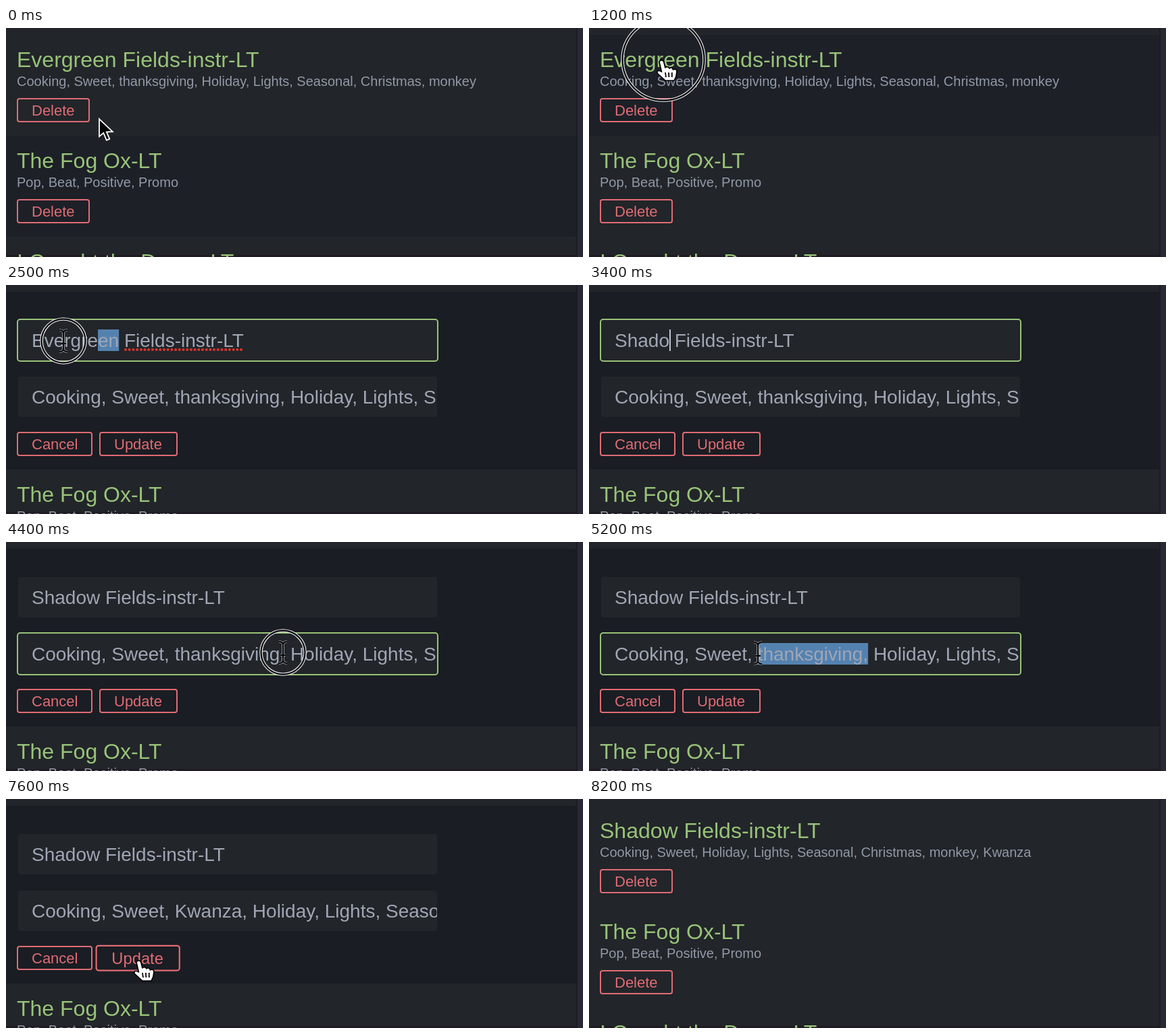
Recreate the animation shown at these times as an HTML page. Size 854 px wide and 340 px high, loop 8300 ms.

```html
<!DOCTYPE html>
<html lang="en">
<head>
<meta charset="utf-8">
<title>Editing a track</title>
<style>
  html, body { margin: 0; width: 854px; height: 340px; overflow: hidden; background: #222529; }
  svg { display: block; }
  text { font-family: "Liberation Sans", Helvetica, Arial, sans-serif; white-space: pre; }
  .title { font-size: 32px; fill: #98c379; }
  .tags { font-size: 20px; fill: #9199a7; }
  .btn text { font-size: 22px; fill: #e06c75; }
  .btn rect { fill: none; stroke: #e06c75; stroke-width: 2; }
  .field text { font-size: 28px; fill: #a0a6b5; }
  .box { fill: #222529; }
  .focus { fill: none; stroke: #98c379; stroke-width: 2; }
  .select { fill: #5482b0; }
  .caret { fill: #c3c8d2; }
  .squiggle { stroke: #d8342f; stroke-width: 4; stroke-linecap: round; stroke-dasharray: 0.1 5.6; }
  .ring { fill: none; }
</style>
</head>
<body>
<svg id="stage" width="854" height="340" viewBox="0 0 854 340">
  <defs>
    <clipPath id="inner"><rect x="18" y="50" width="620" height="150"/></clipPath>
  </defs>
  <rect width="854" height="340" fill="#222529"/>
  <rect id="hover" width="845"/>
  <rect y="337" width="854" height="3" fill="#1f1822" opacity=".75"/>

  <g id="list">
    <text class="title" id="name" x="16" y="58"></text>
    <text class="tags" id="labels" x="16" y="86"></text>
  </g>
  <g id="form"></g>
  <g id="rest">
    <text class="title" x="16" y="208">The Fog Ox-LT</text>
    <text class="tags" x="16" y="236">Pop, Beat, Positive, Promo</text>
    <text class="title" x="16" y="358">I Caught the Dunes-LT</text>
  </g>

  <rect x="844" width="2" height="340" fill="#1b1d24"/>
  <rect x="846" width="8" height="340" fill="#272a35"/>

  <g id="pointer">
    <g id="ring">
      <circle class="ring" stroke="#f2f2f2" stroke-width="4.600"/>
      <circle class="ring" stroke="#0c0d10" stroke-width="2.400"/>
    </g>
    <path id="arrow" transform="translate(1 2) scale(.9)" d="M0 0V29L7 23L12 35L17 33L12 21.500L22 21Z" fill="#000" stroke="#fff" stroke-width="2"/>
    <g id="hand" transform="translate(-1.500 1) scale(1.100 1)" stroke="#000" stroke-width="1.600" stroke-linejoin="round">
      <path fill="#fff" d="M-4 3C-4 -1 1 -1 2 2L4 11C5 9 9 9 9.500 12C11 10 14 11 14.500 14C17 12 20 14 19.500 17L18.500 24L16 30H4L-6 20C-9 16 -5 14 -1 17Z"/>
      <path fill="none" d="M4 18L5 25M8.500 18L9 25M13 18V25"/>
    </g>
    <g id="beam" fill="none">
      <path stroke="#c9ccd2" stroke-width="3.600"/>
      <path stroke="#08090b" stroke-width="2.300"/>
    </g>
  </g>
</svg>
<script>
const LOOP = 8300, STEP = 100;
const OPEN = 1400, SAVE = 8000;
const OLD_WORD = "Evergreen", NEW_WORD = "Shadow", SUFFIX = " Fields-instr-LT";
const HEAD = "Cooking, Sweet, ", OLD_TAG = "thanksgiving,", NEW_TAG = "Kwanza,";
const TAIL = " Holiday, Lights, Seasonal, Christmas, monkey";
const TAG_KEYS = [5400, 5500, 5600, 5800, 5900, 6000, 6200];
const NAME_KEYS = [2900, 3000, 3100, 3300, 3400, 3500];

// time, x, y, pointer shape
const PATH = [
  [0, 137, 133, "arrow"], [100, 180, 215, "arrow"], [200, 270, 300, "arrow"],
  [300, 388, 250, "arrow"], [400, 290, 120, "arrow"], [500, 120, 60, "hand"],
  [600, 38, 44, "hand"], [700, 38, 44, "hand"], [1000, 110, 47, "hand"],
  [1400, 110, 47, "arrow"], [1600, 118, 66, "beam"], [2100, 170, 83, "beam"],
  [2300, 166, 83, "beam"], [2400, 138, 83, "beam"], [2500, 85, 83, "beam"],
  [2600, 54, 83, "beam"], [2700, 46, 83, "beam"], [2900, 46, 83, ""],
  [3600, 56, 83, "beam"], [3800, 120, 98, "beam"], [4300, 410, 164, "beam"],
  [4400, 410, 164, "beam"], [4900, 250, 165, "beam"], [5400, 250, 165, ""],
  [6700, 252, 167, "beam"], [7000, 428, 190, "beam"], [7100, 380, 212, "arrow"],
  [7400, 215, 238, "hand"], [7500, 199, 239, "hand"], [8000, 199, 239, "arrow"],
  [8100, 199, 239, ""], [LOOP, 199, 239, ""]
];
// press, release, ring gone
const CLICKS = [[1000, 1100, 1300], [2300, 2700, 2800], [4400, 4900, 5100], [7700, 7800, 7900]];
// from, top, height, fill of the highlighted row
const HOVER = [
  [0, 160, 150, "#1d2027"], [400, 10, 150, "#1d2027"], [OPEN, 10, 264, "#1a1d23"],
  [SAVE, 160, 150, "#1d2027"], [8100, 0, 0, "none"]
];

const $ = id => document.getElementById(id);
const show = (el, on) => { el.style.display = on ? "" : "none"; };
const setAttrs = (el, attrs) => { for (const k in attrs) el.setAttribute(k, attrs[k]); };
const typed = (word, keys, t) => word.slice(0, keys.filter(k => k <= t).length);

function add(parent, tag, attrs, text = "") {
  const el = document.createElementNS("http://www.w3.org/2000/svg", tag);
  setAttrs(el, attrs);
  el.textContent = text;
  return parent.appendChild(el);
}

function button(parent, x, y, w, label) {
  const g = add(parent, "g", { class: "btn" });
  add(g, "rect", { x: x + 1, y: y + 1, width: w - 2, height: 34, rx: 3 });
  add(g, "text", { x: x + 22, y: y + 26 }, label);
  return g;
}

function field(y) {
  const g = add($("form"), "g", { class: "field" });
  add(g, "rect", { class: "box", x: 18, y: y + 2, width: 620, height: 60, rx: 4 });
  const select = add(g, "rect", { class: "select", y: y + 16, height: 32 });
  const squiggle = add(g, "line", { class: "squiggle", y1: y + 46, y2: y + 46 });
  const text = add(g, "text", { x: 38, y: y + 42, "clip-path": "url(#inner)" });
  const focus = add(g, "rect", { class: "focus", x: 17, y: y + 1, width: 622, height: 62, rx: 4 });
  const caret = add(g, "rect", { class: "caret", y: y + 16, width: 2, height: 32 });
  const at = i => text.getStartPositionOfChar(i).x;

  return ({ value, focused, from = 0, to = 0, caretAt = -1, wavyFrom = -1 }) => {
    text.textContent = value;
    show(focus, focused);
    show(select, to > from);
    show(caret, caretAt >= 0);
    show(squiggle, wavyFrom >= 0);
    if (to > from) setAttrs(select, { x: at(from), width: at(to) - at(from) });
    if (caretAt >= 0) caret.setAttribute("x", at(caretAt));
    if (wavyFrom >= 0) setAttrs(squiggle, { x1: at(wavyFrom) + 2, x2: text.getEndPositionOfChar(value.length - 1).x - 2 });
  };
}

const drawName = field(50), drawTags = field(134);
button($("form"), 16, 218, 112, "Cancel");
const update = button($("form"), 138, 218, 116, "Update");
button($("list"), 16, 104, 108, "Delete");
button($("rest"), 16, 254, 108, "Delete");
for (const p of $("beam").children)
  p.setAttribute("d", "M-6 -16Q0 -16 0 -11V11Q0 16 -6 16M6 -16Q0 -16 0 -11M0 11Q0 16 6 16M-4 4H4");

function drawForm(t) {
  const nameFocus = t >= 2300 && t < 4400, tagFocus = t >= 4400 && t < 7600;
  const newName = typed(NEW_WORD, NAME_KEYS, t), newTag = typed(NEW_TAG, TAG_KEYS, t);
  const nameFrom = t < 2400 ? 9 : t < 2500 ? 8 : t < 2600 ? 7 : t < 2700 ? 3 : 0;
  const drag = Math.min(1, Math.max(0, (t - 4400) / 500));
  const tagEnd = HEAD.length + OLD_TAG.length;
  const blink = start => t < start || Math.floor((t - start) / 500) % 2 === 0;

  drawName({
    value: (newName || OLD_WORD) + SUFFIX,
    focused: nameFocus,
    from: nameFrom,
    to: nameFocus && !newName ? OLD_WORD.length : 0,
    caretAt: nameFocus && newName && blink(3500) ? newName.length : -1,
    wavyFrom: nameFocus && !newName ? OLD_WORD.length + 1 : -1
  });
  drawTags({
    value: HEAD + (newTag || OLD_TAG) + TAIL,
    focused: tagFocus,
    from: Math.round(tagEnd - OLD_TAG.length * drag),
    to: tagFocus && !newTag ? tagEnd : 0,
    caretAt: tagFocus && newTag && blink(6200) ? HEAD.length + newTag.length : -1
  });
  update.setAttribute("transform", t >= 7400 ? "translate(195.200 236.200) scale(1.08) translate(-196 -236)" : "");
}

function drawPointer(t) {
  const i = PATH.findIndex((p, n) => t >= p[0] && t < PATH[n + 1][0]);
  const [t0, x0, y0, shape] = PATH[i], [t1, x1, y1] = PATH[i + 1];
  const k = shape ? (t - t0) / (t1 - t0) : 0;
  $("pointer").setAttribute("transform", `translate(${x0 + (x1 - x0) * k} ${y0 + (y1 - y0) * k})`);
  for (const id of ["arrow", "hand", "beam"]) show($(id), id === shape);

  const click = CLICKS.find(c => t >= c[0] && t < c[2]);
  show($("ring"), click);
  if (!click) return;
  const r = t < click[1] ? 32.5 : 46 + 14.5 * (t - click[1]) / 100;
  for (const c of $("ring").children) c.setAttribute("r", r);
}

function draw(t) {
  const editing = t >= OPEN && t < SAVE, saved = t >= SAVE;
  const [, y, height, fill] = HOVER.filter(h => h[0] <= t).pop();
  setAttrs($("hover"), { y, height, fill });
  show($("list"), !editing);
  show($("form"), editing);
  $("rest").setAttribute("transform", `translate(0 ${editing ? 114 : 0})`);
  $("name").textContent = (saved ? NEW_WORD : OLD_WORD) + SUFFIX;
  $("labels").textContent = saved
    ? HEAD.trim() + TAIL + ", Kwanza"
    : HEAD + OLD_TAG + TAIL;
  if (editing) drawForm(t);
  drawPointer(t);
}

const begin = performance.now();
let last = -1;
function tick() {
  const t = Math.floor((performance.now() - begin) % LOOP / STEP) * STEP;
  if (t !== last) draw(last = t);
  requestAnimationFrame(tick);
}
tick();
</script>
</body>
</html>
```
